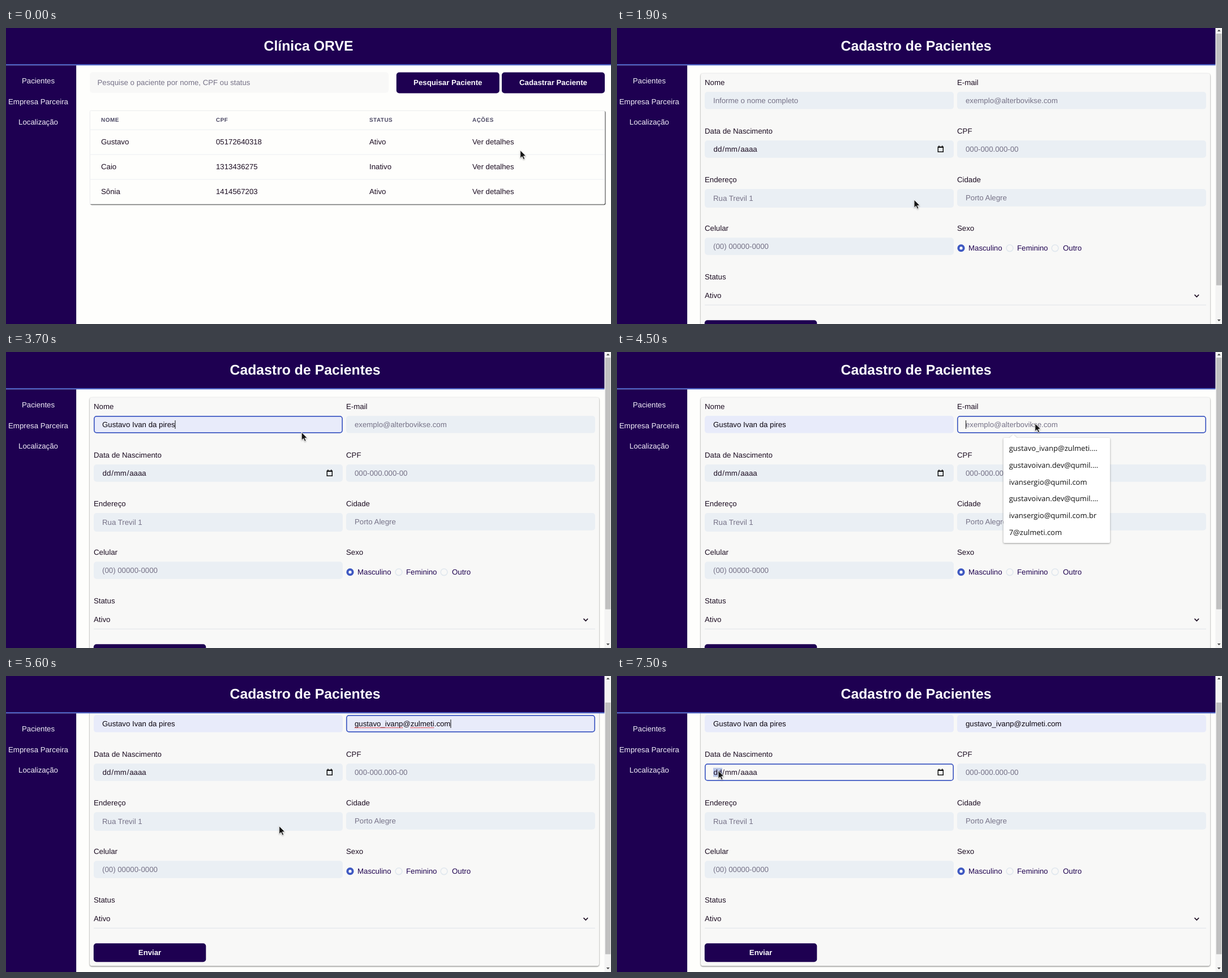
Animation of 1069x524 px, one loop 8000 ms. Source, as an HTML page:

```html
<!DOCTYPE html>
<html lang="pt-BR">
<head>
<meta charset="utf-8">
<title>Cadastro de Pacientes</title>
<style>
  html, body { margin: 0; width: 100%; height: 100%; overflow: hidden; background: #fefefc; }
  svg { display: block; width: 1069px; height: 524px; }
  text {
    font: 13.24px "Liberation Sans", Arial, sans-serif;
    fill: #1c0d22; text-rendering: geometricPrecision; white-space: pre;
  }
  .title { font-size: 24.8px; font-weight: bold; fill: #fdfcff; }
  .nav { fill: #f1edf8; }
  .strong { font-weight: bold; fill: #fdfcff; }
  .th { font-size: 9.93px; font-weight: bold; letter-spacing: .05em; fill: #4b4863; }
  .hint { fill: #767287; }
  .radio { fill: #1f0350; }
  .value { fill: #0c0610; }
  .ui { font: 500 13px "Open Sans", "Noto Sans", sans-serif; fill: #111; }
  .mid { text-anchor: middle; }
  .card { filter: drop-shadow(0 1px .8px rgba(0, 0, 0, .55)); }
  .table { filter: drop-shadow(1px 1px .5px rgba(0, 0, 0, .75)); }
  .pop { filter: drop-shadow(0 1px 1.5px rgba(0, 0, 0, .4)); }
  .pointer { filter: drop-shadow(0 1px 1px rgba(0, 0, 0, .3)); }
</style>
</head>
<body>
<svg id="stage" viewBox="0 0 1069 524"></svg>
<script>
const LOOP = 8000, STEP = 100, SCROLL = 44;
const FIELD = '#eaeff4', AUTOFILL = '#e8ebfa', CARD = '#f8f8f7', BLUE = '#3f59c2', NAVY = '#1e0051';
const NAME = 'Gustavo Ivan da pires', MAIL = 'gustavo_ivanp@zulmeti.com';
const stage = document.getElementById('stage');
const $ = id => document.getElementById(id);
const rowY = i => 113 + 86.06 * i;

// Text is placed by the middle of its line.
const text = (x, middle, str, cls = '', size = 13.24, extra = '') =>
  `<text x="${x}" y="${middle + size * .358 - .7}" class="${cls}" ${extra}>${str}</text>`;
const rect = (x, y, w, h, fill, rx = 0, extra = '') =>
  `<rect x="${x}" y="${y}" width="${w}" height="${h}" rx="${rx}" fill="${fill}" ${extra}/>`;
const line = (x1, x2, y, color) =>
  `<path d="M${x1} ${y}H${x2}" stroke="${color}" stroke-width="1"/>`;
const group = (id, content) => `<g id="${id}">${content}</g>`;
const button = (x, y, w, h, label) =>
  rect(x, y, w, h, NAVY, 5) + text(x + w / 2, y + h / 2, label, 'strong mid');

function tablePage() {
  const columns = [168, 371, 642, 824];
  const row = (cells, y, cls, size) => cells.map((c, i) => text(columns[i], y, c, cls, size)).join('');
  const people = [
    ['Gustavo', '05172640318', 'Ativo'],
    ['Caio', '1313436275', 'Inativo'],
    ['Sônia', '1414567203', 'Ativo']
  ];
  return rect(148, 78.3, 528, 36.5, CARD, 5) +
    text(161.5, 97, 'Pesquise o paciente por nome, CPF ou status', 'hint') +
    button(689.8, 78.5, 182, 37, 'Pesquisar Paciente') +
    button(876, 78.5, 182, 37, 'Cadastrar Paciente') +
    rect(148.2, 146.3, 909.8, 165.5, '#fefefc', 2, 'class="table" stroke="#ecedee"') +
    row(['NOME', 'CPF', 'STATUS', 'AÇÕES'], 163, 'th', 9.93) +
    people.map((p, i) => line(149, 1058, 180 + 44 * i, '#ebeef1') +
      row([...p, 'Ver detalhes'], 202 + 44 * i)).join('');
}

function field(id, x, row, label, hint, h = 30.6) {
  const y = rowY(row);
  return text(x, y - 16, label) +
    rect(x, y, 440, h, FIELD, 5, `id="${id}Box"`) +
    text(x + 15, y + h / 2 + .6, hint, 'hint', 13.24, `id="${id}Text"`);
}

function dateField(x, row) {
  const y = rowY(row);
  const parts = [[170.6, 'dd'], [186.2, '/'], [190.8, 'mm'], [213.7, '/'], [218.2, 'aaaa']];
  return text(x, y - 16, 'Data de Nascimento') +
    rect(x, y, 440, 30.6, FIELD, 5, 'id="dateBox"') +
    rect(170, y + 7.5, 16, 16, '#b9c6e8', 0, 'id="daySelected"') +
    parts.map(([px, s]) => text(px, y + 15.9, s)).join('') +
    `<path d="M567.3 ${y + 11.5}h9v8.7h-9zM567.3 ${y + 12.3}h9M569 ${y + 9.3}v2M574.7 ${y + 9.3}v2"
      fill="none" stroke="#111" stroke-width="1.5"/>`;
}

function radio(x, label, textX, checked) {
  const dot = checked
    ? `<circle cx="${x}" cy="389.7" r="6.6" fill="${BLUE}"/><circle cx="${x}" cy="389.7" r="2.6" fill="#fff"/>`
    : `<circle cx="${x}" cy="389.7" r="5.9" fill="none" stroke="#e0e7ee" stroke-width="1.6"/>`;
  return dot + text(textX, 390, label, 'radio');
}

function formBody() {
  return rect(148, 80.2, 900, 477, CARD, 4, 'class="card"') +
    field('name', 155, 0, 'Nome', 'Informe o nome completo') +
    field('mail', 601, 0, 'E-mail', 'exemplo@alterbovikse.com') +
    dateField(155, 1) +
    field('cpf', 601, 1, 'CPF', '000-000.000-00') +
    field('street', 155, 2, 'Endereço', 'Rua Trevil 1', 33) +
    field('city', 601, 2, 'Cidade', 'Porto Alegre') +
    field('phone', 155, 3, 'Celular', '(00) 00000-0000') +
    text(601, 355, 'Sexo') +
    radio(608, 'Masculino', 621, true) + radio(694, 'Feminino', 707) + radio(774, 'Outro', 788) +
    text(155, 441, 'Status') + text(155, 474, 'Ativo') +
    '<path d="M1020.5 472.2l3.8 3.8 3.8-3.8" fill="none" stroke="#1c0d22" stroke-width="1.7"/>' +
    line(155, 1041, 490.3, '#dfe4e9') +
    button(154.8, 517.2, 198.5, 33, 'Enviar') +
    `<rect id="ring" width="438.4" height="29" rx="4.2" fill="none" stroke="${BLUE}" stroke-width="1.7"/>` +
    '<path id="squiggle" stroke="#d33" stroke-width="1.3" stroke-dasharray="1.6 1"/>' +
    rect(0, 121, 1, 15, '#111', 0, 'id="caret"');
}

function scrollbar() {
  return rect(1057.4, 0, 12, 524, '#f4f4f3') +
    '<path d="M1060.8 6l2.9-3.2 2.9 3.2zM1060.8 516l2.9 3.2 2.9-3.2z" fill="#4c4c4c"/>' +
    rect(1058.8, 10, 9.5, 445.5, '#c0c0c0', 0, 'id="thumb"');
}

function dropdown(id, x, w, items) {
  return group(id,
    `<path class="pop" fill="#fff" d="M${x + 2} 152h9l6.5-6 6.5 6h${w - 26}q2 0 2 2v182q0 2-2 2h${4 - w}q-2 0-2-2v-182q0-2 2-2z"/>` +
    rect(x, 156, w, 30, '#ececec', 0, `id="${id}Hover"`) +
    items.map((s, i) => text(x + 10, 171 + 29.8 * i, s, 'ui')).join(''));
}

const cursors = {
  arrow: '<path class="pointer" d="M0 0V14.2L3.3 11.2 5.6 16.3 8 15.2 5.7 10.3H10.2Z" fill="#151515" stroke="#fff" stroke-width=".9"/>',
  beam: '<path d="M-3-6.2h2.2l.8.8.8-.8H3M-3 6.2h2.2l.8-.8.8.8H3M0-5.4V5.4" fill="none" stroke="#222" stroke-width="1.2"/>',
  hand: '<path class="pointer" d="M-1.3 1q1.3-2 2.6 0v5l6 1.3q1.8.6 1.5 2.6l-1 6h-7.5l-4.6-6q.6-1.8 3 0z" fill="#151515" stroke="#fff" stroke-width=".9"/>'
};

stage.innerHTML =
  rect(0, 0, 1069, 524, '#fefefc') +
  group('tablePage', tablePage()) +
  group('formPage', group('formBody', formBody())) +
  rect(0, 0, 1069, 64.5, NAVY) + rect(0, 64.1, 1069, 2.1, '#4a60c4') +
  rect(0, 66.2, 124.1, 458, NAVY) +
  ['Pacientes', 'Empresa Parceira', 'Localização']
    .map((s, i) => text(57, 94 + 36.5 * i, s, 'nav mid')).join('') +
  text(534.5, 31.4, 'Clínica ORVE', 'title mid', 24.8, 'id="pageTitle"') +
  group('scrollbar', scrollbar()) +
  dropdown('nameList', 236.7, 159, [NAME, 'Ivan Sérgio', 'Ivan Sérgio alterado', 'Gustavo Ivan',
    'teste', 'Gustavo Ivan da Pires']) +
  dropdown('mailList', 682.7, 188.5, ['gustavo_ivanp@zulmeti.…', 'gustavoivan.dev@qumil.…', 'ivansergio@qumil.com',
    'gustavoivan.dev@qumil.…', 'ivansergio@qumil.com.br', '7@zulmeti.com']) +
  group('status', '<path d="M0 505.5H352q2 0 2 2V524H0z" fill="#58c2c1"/>' +
    text(3, 515, 'Aguardando o cache…', 'ui')) +
  group('cursor', Object.entries(cursors).map(([k, v]) => group(k, v)).join(''));

// Pointer path: time, x, y
const path = [
  [0, 908.7, 216.4], [500, 943, 119], [600, 943, 119], [700, 944, 103], [800, 944, 103],
  [1200, 754, 226], [1300, 754, 226], [1600, 550, 286], [1700, 550, 286], [1900, 525, 304],
  [2100, 525, 304], [2600, 321, 132], [3000, 321, 132], [3300, 300, 170], [3500, 300, 170],
  [3900, 744.5, 114], [4000, 744.5, 126], [4100, 744.5, 126], [4300, 738.7, 126.4], [4500, 738.7, 126.4],
  [4800, 745, 168], [5000, 745, 168], [5400, 482.7, 265.6], [5600, 482.7, 265.6], [5800, 470, 243],
  [6100, 200, 170], [6200, 200, 170], [6800, 179, 167.5], [LOOP, 179, 167.5]
];
const shapes = [[0, 'arrow'], [700, 'hand'], [800, 'beam'], [900, 'arrow'], [2500, 'beam'],
  [3100, 'arrow'], [3800, 'beam'], [4300, 'arrow']];

function pointerAt(t) {
  const i = path.findIndex(p => p[0] > t);
  const [t0, x0, y0] = path[i - 1], [t1, x1, y1] = path[i];
  const k = (t - t0) / (t1 - t0), ease = k * k * (3 - 2 * k);
  return [x0 + (x1 - x0) * ease, y0 + (y1 - y0) * ease];
}

const show = (id, on) => $(id).setAttribute('display', on ? 'inline' : 'none');
const set = (id, name, value) => $(id).setAttribute(name, value);

function fill(id, value, hint, filled, focused) {
  const label = $(id + 'Text');
  label.textContent = filled ? value : hint;
  label.setAttribute('class', filled ? 'value' : 'hint');
  set(id + 'Box', 'fill', filled ? AUTOFILL : focused ? CARD : FIELD);
}

function underline() {
  const label = $('mailText'), at = MAIL.indexOf('@'), dot = MAIL.indexOf('.');
  const width = (from, to) => label.getSubStringLength(from, to - from);
  const start = 616 + width(0, at + 1);
  set('squiggle', 'd', `M616 135.5h${width(0, at)}M${start} 135.5h${width(at + 1, dot)}`);
}

function render(t) {
  const form = t >= 800;
  const focus = t >= 7200 ? 'date' : t >= 4400 ? 'mail' : t >= 2600 ? 'name' : '';
  const isMail = focus === 'mail';

  show('tablePage', !form);
  show('formPage', form);
  show('scrollbar', form);
  show('status', form && t < 1200);
  $('pageTitle').textContent = form ? 'Cadastro de Pacientes' : 'Clínica ORVE';
  set('pageTitle', 'x', form ? 528.5 : 534.5);

  fill('name', NAME, 'Informe o nome completo', t >= 3200, focus === 'name');
  fill('mail', MAIL, 'exemplo@alterbovikse.com', t >= 4700, isMail);
  set('dateBox', 'fill', focus === 'date' ? CARD : FIELD);
  show('daySelected', focus === 'date');

  show('ring', focus);
  set('ring', 'x', isMail ? 601.8 : 155.8);
  set('ring', 'y', rowY(focus === 'date' ? 1 : 0) + .8);

  const blink = (t - (isMail ? 4300 : 2600)) % 1000 < 500;
  const filled = isMail ? t >= 5000 : t >= 3500;
  const end = filled ? $(isMail ? 'mailText' : 'nameText').getComputedTextLength() : 0;
  show('caret', (isMail || focus === 'name') && blink);
  set('caret', 'x', (isMail ? 616 : 169.7) + end);
  show('squiggle', isMail && filled);
  if (isMail && filled) underline();

  show('nameList', t >= 2700 && t < 3500);
  show('mailList', t >= 4500 && t < 5000);
  show('nameListHover', t >= 3200);
  show('mailListHover', t >= 4700);

  const scrolled = Math.min(1, Math.max(0, (t - 5400) / 200));
  set('formBody', 'transform', `translate(0 ${-SCROLL * scrolled})`);
  set('thumb', 'y', 10 + 37 * scrolled);

  const [x, y] = pointerAt(t);
  const shape = shapes.filter(s => s[0] <= t).pop()[1];
  set('cursor', 'transform', `translate(${x} ${y})`);
  Object.keys(cursors).forEach(k => show(k, k === shape));
}

const begin = performance.now();
function tick(now) {
  const t = Math.max(0, now - begin) % LOOP;
  render(Math.floor(t / STEP) * STEP);
  requestAnimationFrame(tick);
}
render(0);
requestAnimationFrame(tick);
</script>
</body>
</html>
```
